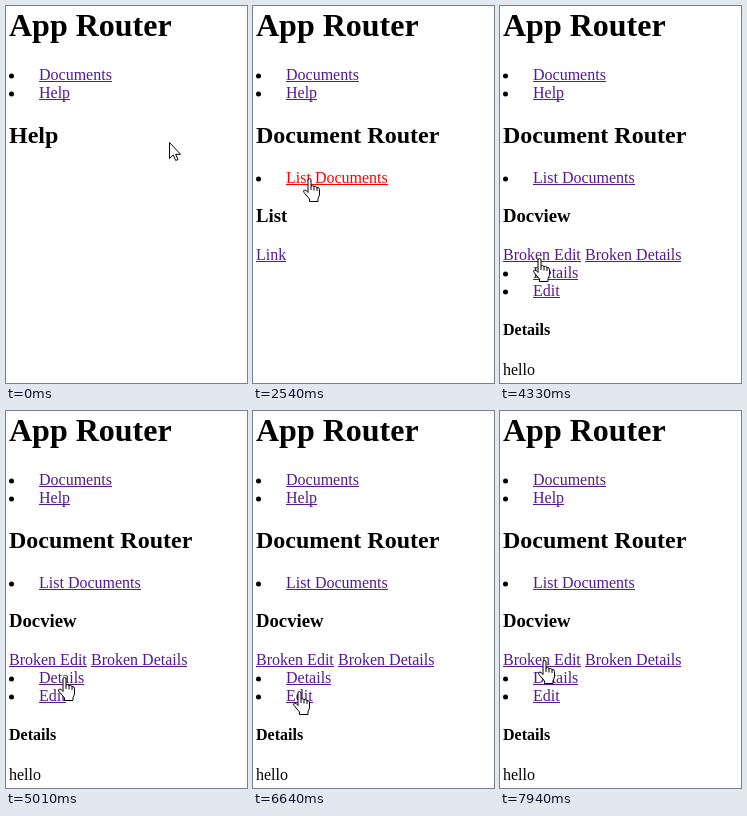
Write an HTML page that moves like this. It is 241 by 377 pixels and loops after 8 s.

```html
<!DOCTYPE html>
<html lang="en">
<head>
<meta charset="utf-8">
<title>App Router</title>
<style>
html, body { margin: 0; width: 100%; height: 100%; overflow: hidden; background: #fff; }
svg { display: block; width: 241px; height: 377px; }
text { font: 16px "Liberation Serif", "Times New Roman", serif; }
.h1 { font-size: 32px; font-weight: bold; }
.h2 { font-size: 24px; font-weight: bold; }
.h3 { font-size: 18.72px; font-weight: bold; }
.h4 { font-weight: bold; }
.link { fill: #551a8b; }
.link.active { fill: #f00; }
.cursor { fill: #fff; stroke: #000; stroke-linejoin: round; }
</style>
</head>
<body>
<svg viewBox="0 0 241 377">
  <g id="page"></g>
  <path id="arrow" class="cursor" d="M.5.5V16.5L4.3 13 6.7 18.5 9 17.5 6.6 12.3H11.5Z"/>
  <g id="hand" class="cursor">
    <path d="M5 14.5V2Q5 .5 6.5 .5T8 2V8Q9.5 7 11 8.5 12.8 7.8 14 9.5 16.5 9.2 16.5 11.5V16Q16.5 18 15 20.5V23.5H6.5V21L1 14.5Q0 12.6 1.5 12 3 11.6 5 14.5Z"/>
    <path fill="none" d="M8 8V12M11 8.5V12.5M14 9.5V13"/>
  </g>
</svg>
<script>
const LOOP = 8000;
const $ = id => document.getElementById(id);
const page = $("page");
const links = {};

function add(parent, tag, attrs, content) {
  const el = document.createElementNS("http://www.w3.org/2000/svg", tag);
  for (const k in attrs) el.setAttribute(k, attrs[k]);
  if (content) el.textContent = content;
  return parent.appendChild(el);
}
const group = () => add(page, "g", {});
const text = (g, cls, y, s) => add(g, "text", { class: cls, x: 3, y }, s);

function link(g, name, x, y) {
  const el = add(g, "g", { class: "link" });
  const w = add(el, "text", { x, y }, name).getComputedTextLength();
  add(el, "rect", { x, y: y + 1, width: Math.round(w), height: 1 });
  links[name] = { el, g, x, y, w };
}
function item(g, name, y) {
  add(g, "circle", { cx: 5.5, cy: y - 4, r: 2.5 });
  link(g, name, 33, y);
}

const base = group();
text(base, "h1", 30, "App Router");
item(base, "Documents", 74);
item(base, "Help", 92);

const help = group();
text(help, "h2", 137, "Help");

const docs = group();
text(docs, "h2", 137, "Document Router");
item(docs, "List Documents", 177);

const list = group();
text(list, "h3", 216, "List");
link(list, "Link", 3, 254);

const view = group();
text(view, "h3", 216, "Docview");
link(view, "Broken Edit", 3, 254);
link(view, "Broken Details", 85, 254);
item(view, "Details", 272);
item(view, "Edit", 290);

const details = group();
text(details, "h4", 329, "Details");
text(details, "", 369, "hello");

const edit = group();
text(edit, "h4", 329, "Edit");

// Press time, release time, link, groups shown after the release
const clicks = [
  [1310, 1460, "Documents", [base, docs, list]],
  [2540, 2610, "List Documents", [base, docs, list]],
  [3720, 3870, "Link", [base, docs, view, details]],
  [5180, 5330, "Details", [base, docs, view, details]],
  [5720, 5870, "Edit", [base, docs, view, edit]],
  [6330, 6480, "Details", [base, docs, view, details]],
  [6790, 6960, "Edit", [base, docs, view, edit]],
  [7340, 7480, "Broken Details", [base, docs, view, details]]
];

// First step, last step, number of steps, target x, target y
const moves = [
  [440, 670, 4, 71, 60],
  [840, 910, 2, 71, 66],
  [1610, 2080, 7, 55, 171],
  [2230, 2230, 1, 56, 172],
  [2780, 3170, 6, 15, 250],
  [3250, 3250, 1, 17, 251],
  [3950, 4630, 10, 51, 253],
  [4710, 5010, 5, 58, 266],
  [5330, 5490, 3, 50, 289],
  [5640, 5640, 1, 46, 280],
  [5940, 6180, 4, 46, 270],
  [6560, 6640, 2, 46, 280],
  [7030, 7260, 4, 118, 252],
  [7560, 7710, 3, 67, 249],
  [7790, 7940, 3, 44, 249]
];

const ease = p => p * p * (3 - 2 * p);

function pointer(t) {
  let x = 163, y = 136;
  for (const [t0, t1, n, tx, ty] of moves) {
    if (t < t0) break;
    const gap = n > 1 ? (t1 - t0) / (n - 1) : 1;
    const step = Math.min(n, Math.floor((t - t0) / gap + 1e-6) + 1);
    const p = ease(step / n);
    x += (tx - x) * p;
    y += (ty - y) * p;
  }
  return [Math.round(x), Math.round(y)];
}

function draw(t) {
  let shown = [base, help], pressed = null;
  for (const [down, up, name, groups] of clicks) {
    if (t >= up) shown = groups;
    else if (t >= down) pressed = name;
  }
  for (const g of page.children) g.style.display = shown.includes(g) ? "" : "none";

  const [x, y] = pointer(t);
  let over = false;
  for (const name in links) {
    const l = links[name];
    l.el.classList.toggle("active", name === pressed);
    if (shown.includes(l.g) && x >= l.x && x < l.x + l.w && y >= l.y - 14 && y < l.y + 4) over = true;
  }
  $("hand").style.display = over ? "" : "none";
  $("arrow").style.display = over ? "none" : "";
  $("hand").setAttribute("transform", `translate(${x - 6} ${y})`);
  $("arrow").setAttribute("transform", `translate(${x} ${y})`);
}

const start = performance.now();
function tick() {
  draw((performance.now() - start) % LOOP);
  requestAnimationFrame(tick);
}
draw(0);
requestAnimationFrame(tick);
</script>
</body>
</html>
```
